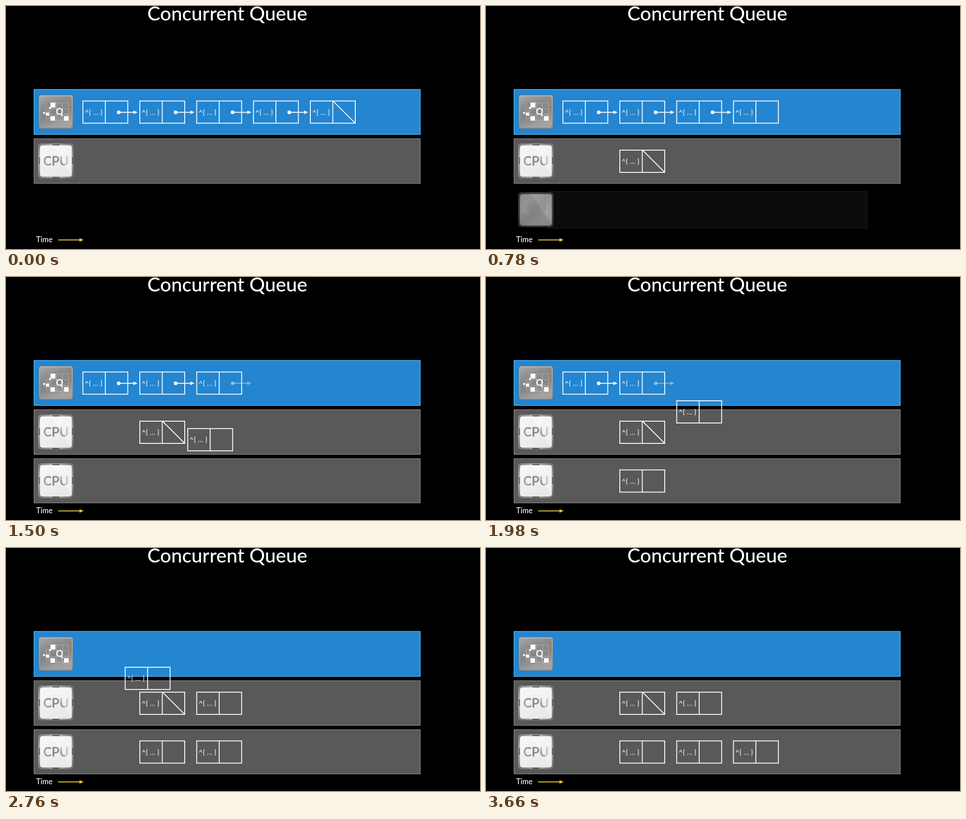
These frames come from a looping animation (1045x536 px, 3720 ms). An HTML page with a canvas:

```html
<!DOCTYPE html>
<html lang="en">
<head>
<meta charset="utf-8">
<title>Concurrent Queue</title>
<style>
html, body { margin: 0; width: 100%; height: 100%; overflow: hidden; background: #000; }
canvas { display: block; }
</style>
</head>
<body>
<canvas id="stage" width="1045" height="536"></canvas>
<script>
const ctx = document.getElementById("stage").getContext("2d");
const LOOP = 3720, MOVE = 660;
const FONT = "Lato, 'Open Sans', sans-serif";

// Queue slot, landing place and middle of each task's move
const tasks = [
  { from: [169, 209], to: [545, 425], mid: 2872 },
  { from: [294.5, 209], to: [420, 425], mid: 2420 },
  { from: [420, 209], to: [420, 317.5], mid: 1945 },
  { from: [545, 209], to: [294.5, 425], mid: 1468 },
  { from: [670.5, 209], to: [294.5, 317.5], mid: 380, last: true }
];

const clamp = v => Math.max(0, Math.min(1, v));
const ramp = (t, start, length) => clamp((t - start) / length);
const ease = u => (1 - Math.cos(Math.PI * u)) / 2;
const progress = (task, t) => ease(ramp(t, task.mid - MOVE / 2, MOVE));

function gradient(x0, y0, x1, y1, ...colors) {
  const g = ctx.createLinearGradient(x0, y0, x1, y1);
  colors.forEach((c, i) => g.addColorStop(i / (colors.length - 1), c));
  return g;
}

function text(str, x, y, size, weight = 400, fill = "#fff") {
  ctx.font = `${weight} ${size}px ${FONT}`;
  ctx.fillStyle = fill;
  ctx.fillText(str, x, y);
}

function rounded(x, y, w, h, r, fill) {
  ctx.beginPath();
  ctx.roundRect(x, y, w, h, r);
  ctx.fillStyle = fill;
  ctx.fill();
}

function bar(y, h, fill, edge, scale = 1) {
  ctx.save();
  ctx.translate(487.5, y + h / 2);
  ctx.scale(scale, scale);
  ctx.fillStyle = fill;
  ctx.fillRect(-426.5, -h / 2, 853, h);
  ctx.strokeStyle = edge;
  ctx.lineWidth = 1.5;
  ctx.strokeRect(-425.8, -h / 2 + 0.7, 851.6, h - 1.4);
  ctx.restore();
}

function arrow(x, y, color, reach) {
  ctx.strokeStyle = ctx.fillStyle = color;
  ctx.lineWidth = 2;
  ctx.beginPath();
  ctx.moveTo(x, y);
  ctx.lineTo(x + reach - 8, y);
  ctx.stroke();
  ctx.beginPath();
  ctx.moveTo(x + reach, y);
  ctx.lineTo(x + reach - 9, y - 4);
  ctx.lineTo(x + reach - 9, y + 4);
  ctx.fill();
}

function block(x, y, last) {
  ctx.strokeStyle = "#f4f8fb";
  ctx.lineWidth = 2;
  ctx.strokeRect(x + 0.5, y + 0.5, 99, 49);
  ctx.beginPath();
  ctx.moveTo(x + 50, y);
  ctx.lineTo(x + 50, y + 50);
  if (last) {
    ctx.moveTo(x + 50, y);
    ctx.lineTo(x + 99, y + 49);
  }
  ctx.stroke();
  text("^{ … }", x + 4.5, y + 30.5, 16);
}

function link(x, y, alpha) {
  ctx.globalAlpha = alpha;
  arrow(x + 79.5, y + 25.5, "#fff", 41.5);
  ctx.beginPath();
  ctx.arc(x + 79.5, y + 25.5, 4, 0, 7);
  ctx.fill();
  ctx.globalAlpha = 1;
}

function queueIcon() {
  rounded(72, 196, 76, 75, 6, "#67777f");
  rounded(73, 197, 74, 73, 5, gradient(0, 197, 0, 270, "#b8b8b8", "#949494"));
  rounded(75, 199, 70, 69, 4, gradient(75, 199, 100, 268, "#a9a9a9", "#8d8d8d", "#858585", "#a2a2a2"));
  ctx.strokeStyle = "#b5b5b5";
  ctx.lineWidth = 0.8;
  for (let i = 0; i < 9; i++)
    ctx.strokeRect(98.5 + i % 3 * 13, 213.5 + Math.floor(i / 3) * 13, 13, 13);
  for (let i = 0; i < 3; i++) ctx.strokeRect(88.5, 224.5 + i * 8, 7, 8);
  ctx.fillStyle = "#fff";
  for (const [x, y, s] of [[98, 213, 11], [98, 243, 10], [128, 243, 10], [88, 235, 7], [95, 223, 4], [82, 234, 4]])
    ctx.fillRect(x, y, s, s);
  text("Q", 110, 240, 20, 700);
}

function cpuIcon(y) {
  rounded(71, y, 77.5, 76.5, 6, gradient(71, y, 149, y + 76, "#777", "#bbb", "#777", "#aaa", "#666"));
  rounded(75, y + 4, 70, 69, 5, gradient(75, y, 145, y + 74, "#fafafa", "#eeeeee", "#e6e6e8"));
  ctx.fillStyle = "#222";
  for (let i = 0; i < 5; i++) {
    for (const dy of [1.5, 73.5]) ctx.fillRect(103 + i * 3, y + dy, 2, 2.5);
    for (const x of [72, 145]) ctx.fillRect(x, y + 31 + i * 3, 3, 1.5);
  }
  text("CPU", 82, y + 48.5, 28, 700, gradient(82, y + 48, 136, y + 30, "#b5b5b5", "#858585", "#929292", "#b0b0b0"));
  ctx.fillStyle = "rgba(255,255,255,.3)";
  ctx.beginPath();
  ctx.moveTo(100, y + 4);
  ctx.lineTo(145, y + 4);
  ctx.lineTo(145, y + 72);
  ctx.fill();
}

function draw(t) {
  ctx.fillStyle = "#000";
  ctx.fillRect(0, 0, 1045, 536);
  text("Concurrent Queue", 311.5, 32, 43, 500);
  text("Time", 66.5, 521, 16.5, 500);
  arrow(115, 516, "#e9c437", 56);

  bar(183.5, 100.5, "#2485d0", "#48b6ee");
  queueIcon();
  bar(292, 100, "#595959", "#7d7d7d");
  cpuIcon(303.5);

  // The second processor fades in while its lane grows
  const shrink = 0.3 * (1 - ramp(t, 680, 590)) ** 3;
  ctx.globalAlpha = ramp(t, 685, 680);
  bar(400, 99, "#595959", "#7d7d7d", 1 - shrink);
  ctx.globalAlpha = ramp(t, 660, 290);
  cpuIcon(411);
  ctx.globalAlpha = 1;

  tasks.forEach((task, i) => {
    const p = progress(task, t);
    const [x, y] = task.from.map((a, k) => a + (task.to[k] - a) * p);
    block(x, y, task.last);
    if (!task.last) link(...task.from, 1 - progress(tasks[i + 1], t));
  });
}

function tick() {
  draw(performance.now() % LOOP);
  requestAnimationFrame(tick);
}
tick();
</script>
</body>
</html>
```
